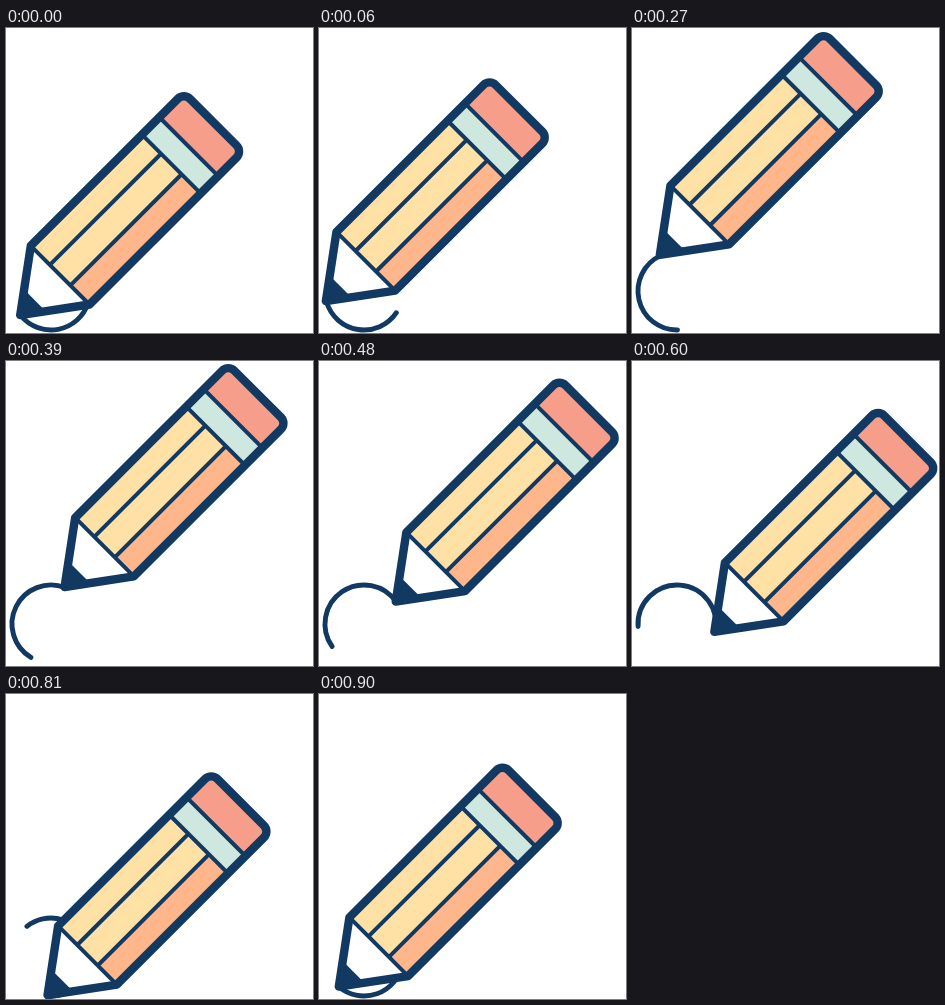
Animation of 307x305 px, one loop 930 ms. Source, as an HTML page:

```html
<!DOCTYPE html>
<html lang="en">
<head>
<meta charset="utf-8">
<title>Drawing pencil</title>
<style>
  html, body { margin: 0; width: 100%; height: 100%; overflow: hidden; background: #fff; }
  svg { display: block; }
</style>
</head>
<body>
<svg width="307" height="305" fill="none" stroke="#113962" stroke-linejoin="round">
  <path id="trail" stroke-width="4.9" stroke-linecap="round"/>
  <!-- The pencil lies along the x axis with its tip at the origin -->
  <g id="pencil">
    <g stroke="none">
      <path fill="#fff" d="M0 0 56.5-41.5V41.5Z"/>
      <path fill="#113962" d="M0 0 20.8-15.3V15.3Z"/>
      <path fill="#ffe0a5" d="M56.5-41.5H213.7V14.5H56.5Z"/>
      <path fill="#ffb68a" d="M56.5 14.5H213.7V41.5H56.5Z"/>
      <path fill="#cee8df" d="M213.7-41.5H238.3V41.5H213.7Z"/>
      <path fill="#f69e89" d="M238.3-41.5H264.5a8.5 8.5 0 0 1 8.5 8.5V33a8.5 8.5 0 0 1-8.5 8.5H238.3Z"/>
    </g>
    <path stroke-width="4" d="M56.5-41.5V41.5M213.7-41.5V41.5M238.3-41.5V41.5M56.5-14.5H213.7M56.5 14.5H213.7"/>
    <path stroke-width="8.4" d="M0 0 56.5-41.5H264.5a8.5 8.5 0 0 1 8.5 8.5V33a8.5 8.5 0 0 1-8.5 8.5H56.5Z"/>
  </g>
</svg>
<script>
  const LOOP = 930, STEP = 30;
  const CENTER = { x: 45, y: 263 }, RADIUS = 39;
  const trail = document.getElementById('trail');
  const pencil = document.getElementById('pencil');

  function pointAt(degrees) {
    const a = degrees * Math.PI / 180;
    return `${CENTER.x + RADIUS * Math.cos(a)} ${CENTER.y + RADIUS * Math.sin(a)}`;
  }

  function draw(now) {
    const t = Math.floor(now % LOOP / STEP) * STEP;
    const head = 140.5 + 360 * t / LOOP;
    const tail = 18 + 0.264 * t;
    const large = head - tail > 180 ? 1 : 0;
    trail.setAttribute('d', `M${pointAt(tail)}A${RADIUS} ${RADIUS} 0 ${large} 1 ${pointAt(head)}`);
    pencil.setAttribute('transform', `translate(${pointAt(head)}) rotate(-45) translate(0 -1)`);
  }

  const start = performance.now();
  function tick() {
    draw(performance.now() - start);
    requestAnimationFrame(tick);
  }
  tick();
</script>
</body>
</html>
```
